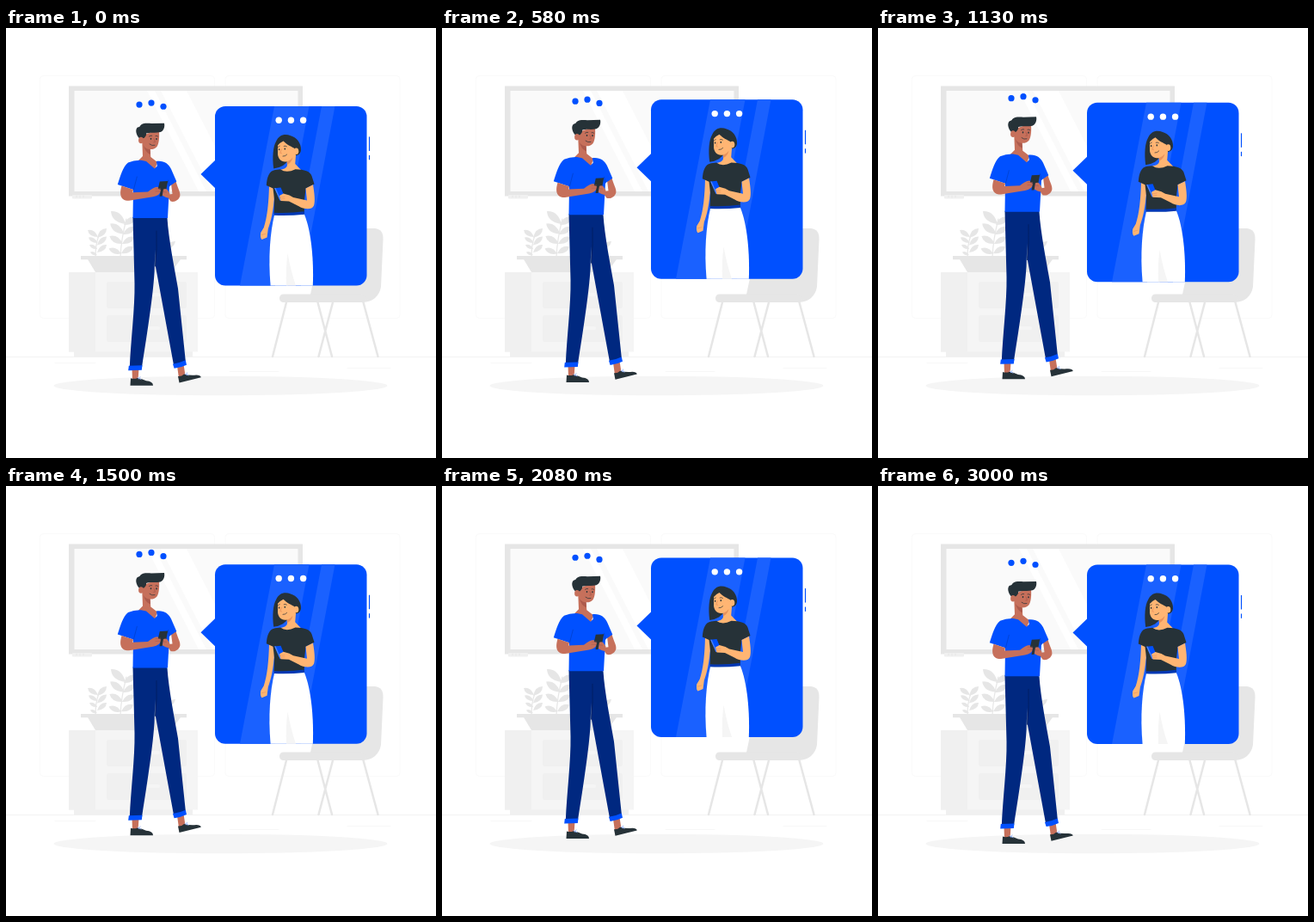
Write an HTML page with a canvas that moves like this. It is 500 px wide and 500 px high and loops after 3.04 s.

```html
<!DOCTYPE html>
<html lang="en">
<head>
<meta charset="utf-8">
<title>Chat</title>
<style>
html, body { margin: 0; width: 100%; height: 100%; overflow: hidden; background: #fff; }
canvas { display: block; width: 500px; height: 500px; }
</style>
</head>
<body>
<canvas id="stage"></canvas>
<script>
const BLUE = '#0050ff', NAVY = '#002880', DARK = '#263238';
const BROWN = '#c6705b', BROWN_SHADE = '#ad5a4c', PEACH = '#ffb573';
const GREY = '#e6e6e6', MID = '#f0f0f0', LIGHT = '#f5f5f5', PALE = '#fafafa';
const LOOP = 3040, STEPS = 73, STEP = 1000 / 24;

const canvas = document.getElementById('stage');
const ctx = canvas.getContext('2d');
const dpr = window.devicePixelRatio || 1;
canvas.width = canvas.height = Math.round(500 * dpr);

function shape(d, color) {
  ctx.fillStyle = color;
  ctx.fill(new Path2D(d));
}
function line(d, color, width) {
  ctx.strokeStyle = color;
  ctx.lineWidth = width;
  ctx.lineCap = 'round';
  ctx.stroke(new Path2D(d));
}
function rect(x, y, w, h, color, r = 0) {
  ctx.fillStyle = color;
  ctx.beginPath();
  ctx.roundRect(x, y, w, h, r);
  ctx.fill();
}
function oval(x, y, rx, ry, color) {
  ctx.fillStyle = color;
  ctx.beginPath();
  ctx.ellipse(x, y, rx, ry, 0, 0, 7);
  ctx.fill();
}
// leaf from its base (x, y) to its tip (u, v)
function leaf(x, y, u, v, fat) {
  const nx = (y - v) * fat, ny = (u - x) * fat;
  const mx = x + (u - x) * 0.6, my = y + (v - y) * 0.6;
  ctx.fillStyle = GREY;
  ctx.beginPath();
  ctx.moveTo(x, y);
  ctx.quadraticCurveTo(mx + nx, my + ny, u, v);
  ctx.quadraticCurveTo(mx - nx, my - ny, x, y);
  ctx.fill();
}

function wall() {
  ctx.strokeStyle = PALE;
  ctx.lineWidth = 1;
  for (const x of [39.5, 255]) {
    ctx.beginPath();
    ctx.roundRect(x, 55.5, 203, 282, 4);
    ctx.stroke();
  }
  line('M0 382.5H500', MID, 0.8);
  line('M57 389.5H104M260 399.5H317M397 395.5H447', LIGHT, 0.8);
}

function screen() {
  rect(73, 67.5, 272, 128, GREY);
  rect(79.5, 73, 260, 117, PALE);
  shape('M164 73H173L233 190H224ZM180 73H210L270 190H240Z', '#fff');
  rect(77, 194, 23, 4.5, MID, 1);
  line('M82 195V197M86 195V197M90 195V197', GREY, 1);
}

function plants() {
  line('M133 266Q134 245 140 222M104 266Q104 252 108 241', GREY, 1.2);
  for (let i = 0; i < 4; i++) {
    leaf(139 - i * 1.6, 228 + i * 11.5, 122 - i * 0.8, 213 + i * 14.5, 0.4);
    leaf(137 - i, 229 + i * 11, 151 - i, 220 + i * 11.5, 0.42);
    leaf(107 - i * 0.4, 243 + i * 7, 95 + i, 235 + i * 8.5, 0.4);
  }
  for (let i = 0; i < 3; i++) leaf(106, 244 + i * 8.5, 117, 233 + i * 9.5, 0.4);
  leaf(184, 258, 197, 248, 0.35);
  rect(87, 265, 123, 4.2, GREY);
  shape('M95 269H203L192 284H104Z', GREY);
}

function cabinet() {
  rect(79, 376, 138, 6.5, MID);
  rect(73, 284, 150, 92.5, LIGHT);
  rect(73, 284, 31, 92.5, MID);
  for (const y of [295, 334]) {
    rect(117, y, 93, 31, MID, 2);
    rect(150, y + 13, 29, 4, LIGHT, 2);
  }
}

function chair() {
  line('M326 319L310 382M380 319L363.5 382M362.5 319L379 382M415.5 319L432.5 382', GREY, 2.5);
  shape('M372 233H429Q439 234 438.5 246L436 301Q433 317 416 319H352L358 291Z', GREY);
  rect(318, 309.5, 100, 9.6, GREY, 4.5);
}

function man() {
  oval(155, 89, 3.6, 3.6, BLUE);
  oval(169, 87, 3.6, 3.6, BLUE);
  oval(183, 91.2, 3.6, 3.6, BLUE);

  // feet
  shape('M146.5 396H154.5L153.5 410H147ZM199 393L206.5 391L208.5 404L201 407Z', BROWN);
  shape('M145 407.3Q149 408.5 153 407Q158 408 163 410.3Q171 411 171 415.7H144.5Z', DARK);
  shape('M200 405Q204 405.5 207 402.5Q213 404 219 403.7Q226 403 226.8 406.3L201.5 412.5Z', DARK);
  line('M153 406.5L157 408.5M156 405.5L154.5 408M208 402L212 403.8M210.5 400.8L210 403.5', '#99b9ff', 0.9);

  // legs
  shape('M172 221H187.5C189 245 196 280 200 303L209 389L195 392L173.5 275Z', NAVY);
  shape('M147.5 220H187.5L174 240L172.5 285C171 310 165 350 158 394.5H143.8C145 365 150 325 149.5 297Z', NAVY);
  line('M175 236Q176 257 173.5 277', '#001c5c', 0.8);
  shape('M142.8 392.8L158.5 392.3L157.8 397.8L142.2 398.2Z', BLUE);
  shape('M194 390.6Q202 389.5 208.8 386.3L210 391.6Q203 395 195.6 395.8Z', BLUE);

  // head and neck
  shape('M158 125L177.8 118C178.8 127 177.8 134.5 175.5 138C173 140.8 169.5 141.3 167.5 141L168.3 150L176 156L173 165L154 154L159 149Z', BROWN);
  shape('M159.5 136Q162 141 167.6 141L168 147Q162 145 159.5 136Z', BROWN_SHADE);
  shape('M155.2 128.5C151 124 150 118 153 115.5C155 115 156 114.5 156 113.6C158 110.5 164 110.6 169 111L184 110.6C185 115 183 119.8 179.5 121C174 122.5 168 120.8 163 122.5C163.5 125 162 126 160.5 128Z', DARK);
  oval(157, 130.5, 2.9, 3.8, BROWN);
  oval(168.5, 128.8, 0.8, 1.1, DARK);
  oval(175, 129, 0.8, 1.1, DARK);
  line('M166.5 126Q168 124.6 169.7 125.2M174 125.5Q175.5 125 176.7 126M167 135Q169.5 137.3 173 136.3', DARK, 0.7);
  line('M172 128.5L173.5 132.5L171.8 132.8', BROWN_SHADE, 0.9);

  // shirt and arms
  shape('M192 181L197.5 178C199 185 203.3 191 202.3 195.5C201 200 196 203 191.5 201.5L186 194L193.5 193Z', BROWN);
  shape('M157 153.8L163 155L172.8 163.5L175.8 160.5L174.8 155C184 154 189 158 192 164L198.3 178.5L190 184L188 221H147.5L148 188L129.8 182C133 172 136 161 142 156.5Q149 153.5 157 153.8Z', BLUE);
  line('M152.3 173L148.4 188M190 184L188.5 177', '#0040cc', 0.8);
  shape('M134.5 183.5L148 188L147.2 191.3L165 190.5Q171 185.5 176 184.8L180.8 188.5Q179 195 171 196.3L143 200.8C132 201 132 192 134.5 183.5Z', BROWN);
  shape('M178.8 178.5L188.2 178L186.3 188L183.5 188L181.5 195.8H178.5L180 187.8L176.8 187Z', DARK);
  shape('M183 187.5Q187 186 188.5 189.5L190.5 192.5L190 198Q185 197 181.8 194.8Z', BROWN);
  line('M174 187L179.5 186.8M174 190L179.3 189.8M183 190.5L186.5 191', BROWN_SHADE, 0.6);
}

function woman() {
  // head
  shape('M311.2 163.5C309.5 150 310.5 138 314 132C317 124.5 324 122.3 331 125.2C338 127 343.5 134 343 142C342.5 147 339 148.5 336 148L322 160Q317 163 311.2 163.5Z', DARK);
  shape('M316 136.5Q319 133 322.5 131.5C327 136 332 138 335.5 140L337 148L336.2 158L344 166L330 170L318 165Q326 164 327 160L326.6 155.3C320 156.5 316.8 152 316 147Z', PEACH);
  oval(337.5, 143.3, 2.8, 3.8, PEACH);
  shape('M327 155.2Q331 154 333.5 150.5Q332 156.5 327 159Z', '#e8925c');
  oval(317.6, 141.3, 0.8, 1.1, DARK);
  oval(324.3, 140.6, 0.8, 1.1, DARK);
  line('M316.5 138.4L318.2 137.4M323.2 137.4Q325 136.6 326.4 137.8M322 149.2Q325 149.4 326.6 147.2', DARK, 0.7);
  line('M320.3 141L318.9 145.4L320.5 145.8', '#e8925c', 0.8);

  // hanging arm
  shape('M306 183L312 186C312.5 205 309 222 304.8 233.5L303.5 243.5L297.5 246Q295.3 244 296.2 238L299.8 232C304 219 305.5 203 306 183Z', PEACH);
  line('M297.5 240.5L301.5 239.5', '#e8925c', 0.6);

  // trousers
  shape('M312.2 217C307 238 304.8 268 307.6 299.5H356.8C358 270 355 236 346.8 216.5Z', '#fff');
  shape('M327.5 262Q325 282 326 299.5H337Q331 282 327.5 262Z', LIGHT);

  // top
  shape('M319 164.3Q326 169.5 336.5 164.3C347 164.5 354 167 355.5 172L358.5 181.5L348.5 186.5L347 200L346.8 216H311.5L312 199L310.5 186.5L302.8 183C303.5 173 306 166 313 165Z', DARK);
  shape('M312 214.8Q330 215.6 346.8 213.3V216.8Q330 218.5 311.5 217.8Z', '#0038b3');

  // phone and raised arm
  shape('M312.2 186.3L319.5 185.5L325.5 200L318.5 200.5Z', BLUE);
  shape('M312.2 186.3L313.6 186.1L319.8 200.4L318.5 200.5Z', '#4d85ff');
  shape('M348.5 186.5L357 182.3C358.5 192 359.8 201 358 206.5C355.5 212 346.5 211 340 207L329 201.5L319.5 201L318 195L322.5 192.5L329.5 194.5L334 197L350 200.5Z', PEACH);
  line('M319 197L324 196.3M319.5 199L324 198.6', '#e8925c', 0.6);
}

function bubble() {
  rect(243, 91, 176.5, 208.5, BLUE, 12);
  shape('M243.5 153.5L226.5 170L243.5 186.5Z', BLUE);
  shape('M312 91H352.5L313 299.5H272ZM367 91H382.5L343 299.5H327.5Z', '#1a61ff');
  for (const x of [317.2, 331.4, 345.6]) oval(x, 107.3, 3.7, 3.7, '#fff');
  woman();
  rect(421.9, 126.5, 1.2, 16.5, BLUE);
  rect(421.9, 148, 1.2, 5.3, BLUE);
}

// linear rise and fall of 10 px
function lift(step, period) {
  const p = (step % period) / period;
  return 10 * (1 - Math.abs(1 - 2 * p));
}
function shifted(y, draw) {
  ctx.save();
  ctx.translate(0, y);
  draw();
  ctx.restore();
}

function render(time) {
  const step = Math.floor((time % LOOP + 4) / STEP) + 1;
  ctx.setTransform(dpr, 0, 0, dpr, 0, 0);
  rect(0, 0, 500, 500, '#fff');
  wall();
  screen();
  cabinet();
  plants();
  chair();
  oval(249.5, 416, 194, 11.3, LIGHT);
  shifted(0.5 - lift(step, STEPS / 2), bubble);
  shifted(0.3 - lift(step, STEPS), man);
}

const start = performance.now();
function tick() {
  render(performance.now() - start);
  requestAnimationFrame(tick);
}
tick();
</script>
</body>
</html>
```
